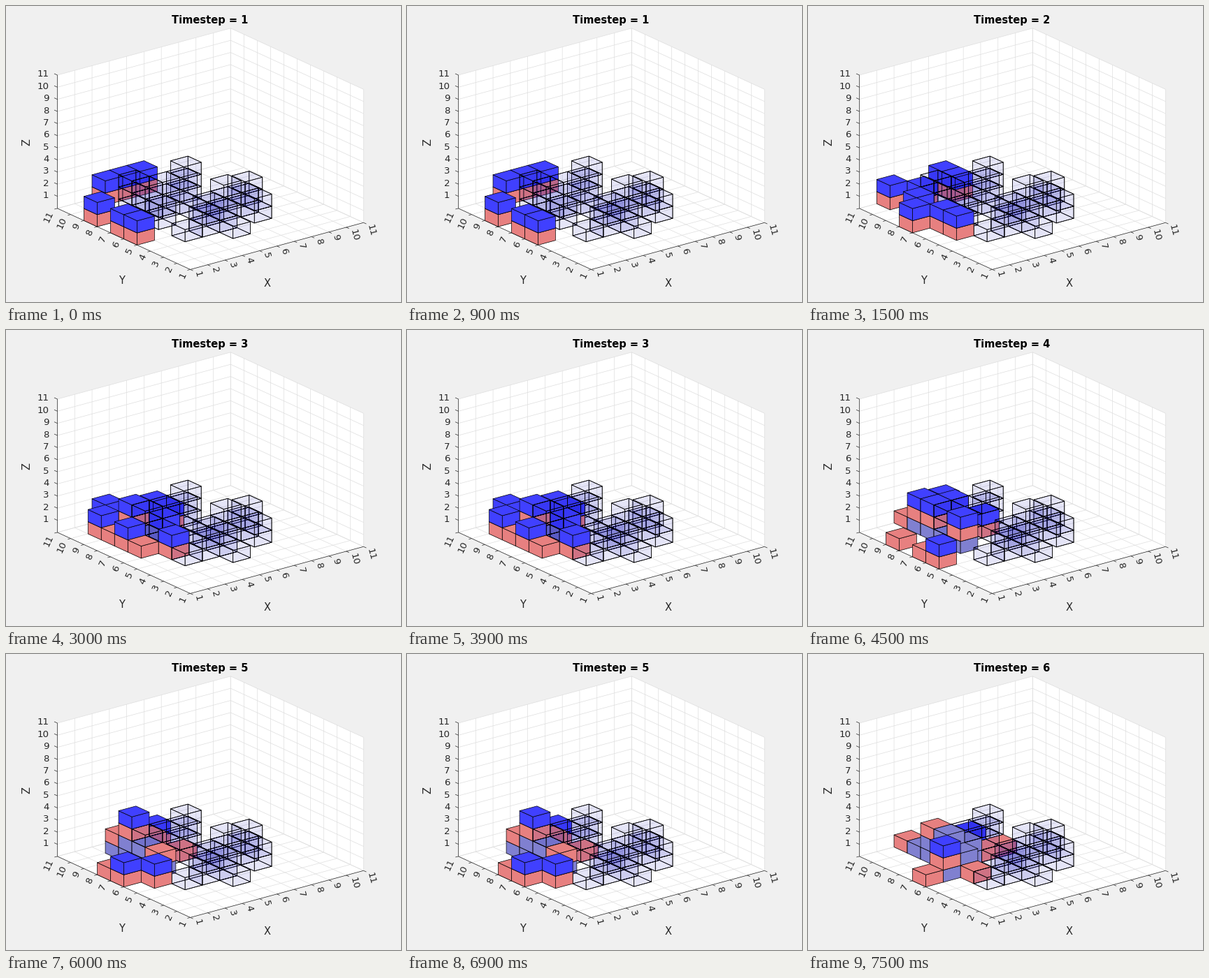
Write a matplotlib script that moves like this. It is 565 px wide and 424 px high and loops after 8000 ms.

```python
import matplotlib.pyplot as plt
from matplotlib.animation import FuncAnimation
from matplotlib.collections import LineCollection, PolyCollection

W, H, DPI = 565, 424, 100
INK = (0.15, 0.15, 0.15)
THIN = 0.5
N, TOP = 10, 11

COLORS = {"r": (0.906, 0.5, 0.5, 1), "b": (0.25, 0.25, 1, 1),
          "p": (0.5, 0.5, 0.816, 1), "g": (0, 0, 0.7, 0.05)}

# Height of the translucent target structure at each (x, y) cell
TARGET = {(2, 7): 3, (2, 6): 3, (2, 5): 2, (3, 6): 3, (4, 6): 3, (5, 7): 3,
          (4, 5): 1, (5, 5): 1, (2, 3): 1, (3, 3): 2, (4, 3): 2, (4, 2): 1,
          (4, 4): 2, (5, 4): 3, (6, 4): 2, (6, 3): 2, (7, 5): 2}

# Stacks per timestep, each written from the floor upwards
STEPS = [
    {"rb": [(0, 7), (0, 5), (0, 4), (2, 9), (3, 9), (4, 9)]},
    {"rb": [(1, 9), (2, 8), (1, 7), (0, 6), (1, 5), (1, 4), (4, 9), (4, 8)]},
    {"rb": [(2, 9), (1, 8), (1, 6), (4, 8), (4, 7), (2, 4)],
     "r": [(1, 7), (1, 5)], "prb": [(2, 7)], "pb": [(3, 6)]},
    {"r": [(0, 7), (0, 5), (2, 9)], "rb": [(0, 4), (4, 9), (4, 6)],
     "prb": [(2, 8), (2, 7), (3, 7), (2, 5)], "p": [(2, 6)]},
    {"r": [(0, 6), (4, 6)], "rb": [(0, 5), (1, 4), (4, 8)],
     "pr": [(2, 8), (3, 7), (2, 5)], "pprb": [(2, 7)], "pp": [(2, 6)]},
    {"r": [(2, 9), (0, 5), (2, 4), (4, 6), (5, 6)], "p": [(2, 8)],
     "ppr": [(2, 7)], "ppp": [(2, 6)], "pp": [(2, 5), (3, 6)],
     "prb": [(1, 5)], "rb": [(4, 7)]},
]


def project(x, y, z):
    return (263.6 + 24.78 * x - 19.01 * y,
            377.4 - 6.71 * x - 8.75 * y - 17.36 * z)


def cube_faces(cell, hidden):
    """Faces of a unit cube, the far ones first."""
    x, y, z = cell

    def face(axis, side):
        out = []
        for u, v in ((0, 0), (1, 0), (1, 1), (0, 1)):
            d = [u, v]
            d.insert(axis, side)
            out.append(project(x + d[0], y + d[1], z + d[2]))
        return out

    near = [face(0, 0), face(1, 0), face(2, 1)]
    far = [face(0, 1), face(1, 1), face(2, 0)]
    return far + near if hidden else near


def build(stacks):
    cells = {(x, y, z): "g" for (x, y), h in TARGET.items() for z in range(h)}
    for kinds, places in stacks.items():
        for x, y in places:
            for z, kind in enumerate(kinds):
                cells[x, y, z] = kind
    faces, fills = [], []
    for cell in sorted(cells, key=lambda c: c[2] - c[0] - c[1]):
        kind = cells[cell]
        new = cube_faces(cell, kind == "g")
        faces += new
        fills += [COLORS[kind]] * len(new)
    return faces, fills


fig = plt.figure(figsize=(W / DPI, H / DPI), dpi=DPI, facecolor="#f0f0f0")
ax = fig.add_axes([0, 0, 1, 1])
ax.set_xlim(0, W)
ax.set_ylim(H, 0)
ax.axis("off")


def write(x, y, text, px=13.33, **kw):
    opts = dict(color=INK, ha="center", va="center", family="DejaVu Sans")
    opts.update(kw)
    return ax.text(x, y, text, fontsize=px * 72 / DPI, **opts)


def lines(segments, color, order):
    ax.add_collection(LineCollection(segments, colors=[color],
                                     linewidths=THIN, zorder=order))


def draw_box():
    walls = [[(0, 0, 0), (N, 0, 0), (N, N, 0), (0, N, 0)],
             [(0, N, 0), (N, N, 0), (N, N, TOP), (0, N, TOP)],
             [(N, 0, 0), (N, N, 0), (N, N, TOP), (N, 0, TOP)]]
    ax.add_collection(PolyCollection([[project(*p) for p in w] for w in walls],
                                     facecolors="white", edgecolors="none",
                                     zorder=0))
    grid = []
    for i in range(N + 1):
        grid.append([project(i, 0, 0), project(i, N, 0), project(i, N, TOP)])
        grid.append([project(0, i, 0), project(N, i, 0), project(N, i, TOP)])
    for z in range(TOP + 1):
        grid.append([project(0, N, z), project(N, N, z), project(N, 0, z)])
    lines(grid, (0.87, 0.87, 0.87), 1)

    rules = [[project(N, 0, 0), project(0, 0, 0),
              project(0, N, 0), project(0, N, TOP)]]
    for i in range(N + 1):
        label = str(i + 1)
        x, y = project(i, 0, 0)
        rules.append([(x, y), (x + 4, y + 1.8)])
        write(x + 9, y + 3, label, rotation=-75, ha="left",
              rotation_mode="anchor")
        x, y = project(0, i, 0)
        rules.append([(x, y), (x - 4.2, y + 1.1)])
        write(x - 9, y + 4.5, label, rotation=65, ha="right",
              rotation_mode="anchor")
        x, y = project(0, N, i + 1)
        rules.append([(x, y), (x - 4.5, y - 2)])
        write(61.5, y - 2.5, label, ha="right", va="center_baseline")
    lines(rules, INK, 2)

    write(374, 397, "X", 14.67)
    write(165, 394, "Y", 14.67)
    write(30, 195, "Z", 14.67, rotation=90)


draw_box()
title = write(292, 25, "", 14.67, color="black", weight="bold", va="baseline")
cubes = PolyCollection([], edgecolors="black", linewidths=THIN, zorder=3)
ax.add_collection(cubes)
SCENES = [build(s) for s in STEPS]


def update(i):
    step = i // 3
    faces, fills = SCENES[step]
    cubes.set_verts(faces)
    cubes.set_facecolor(fills)
    title.set_text(f"Timestep = {step + 1}")
    return cubes, title


anim = FuncAnimation(fig, update, frames=16, interval=500,
                     init_func=lambda: update(0), repeat=True, repeat_delay=0)
plt.show()
```
